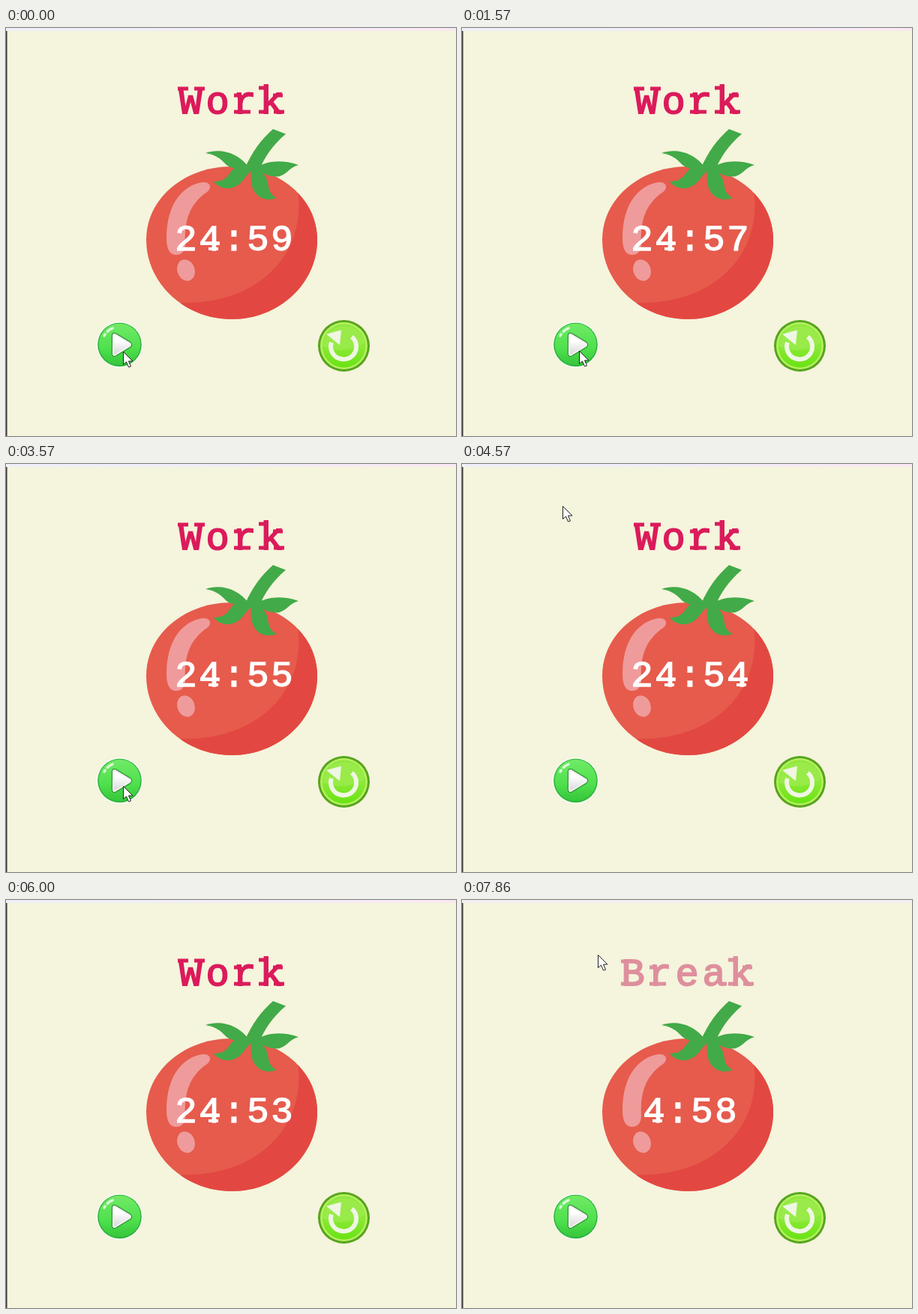
These frames come from a looping animation (600x545 px, 8000 ms). An HTML page:

```html
<!DOCTYPE html>
<html lang="en">
<head>
<meta charset="utf-8">
<title>Tomato timer</title>
<style>
  html, body { margin: 0; width: 100%; height: 100%; overflow: hidden; background: #f5f4dc; }
  svg { display: block; width: 100%; height: 100%; }
  text { font-family: "Liberation Mono", "Courier New", monospace; text-anchor: middle; }
  #title { font-size: 52px; letter-spacing: 4.8px; stroke-width: 1.8px; }
  #clock { font-size: 49px; letter-spacing: 2.6px; stroke: #fff; stroke-width: 1.4px; }
</style>
</head>
<body>
<svg viewBox="0 0 600 545">
  <defs>
    <linearGradient id="bar">
      <stop stop-color="#efeff8"/><stop offset=".5" stop-color="#f1edf6"/><stop offset="1" stop-color="#fae8f1"/>
    </linearGradient>
    <linearGradient id="playFill" x2="0" y2="1">
      <stop stop-color="#70ea68"/><stop offset=".6" stop-color="#4fe04c"/><stop offset="1" stop-color="#35c63b"/>
    </linearGradient>
    <linearGradient id="triangleFill" x2="0" y2="1">
      <stop offset=".3" stop-color="#fff"/><stop offset="1" stop-color="#d8d8d8"/>
    </linearGradient>
    <linearGradient id="resetFill" x2="0" y2="1">
      <stop stop-color="#8fe83c"/><stop offset=".5" stop-color="#8ce936"/><stop offset="1" stop-color="#69e313"/>
    </linearGradient>
    <path id="body" d="M187 283C187 228 237 185 301 185C365 185 415 228 415 283C415 341 364 389 301 389C238 389 187 341 187 283Z"/>
    <clipPath id="bodyClip"><use href="#body"/></clipPath>
    <path id="triangle" d="M143 411V435Q143 438 146 436.500L165 425Q167 423 165 421L146 409.500Q143 408 143 411Z" stroke-linejoin="round"/>
  </defs>

  <rect width="600" height="545" fill="#f5f4dc"/>
  <rect id="topBar" width="600" height="4" fill="url(#bar)"/>
  <rect y="4" width="1.5" height="541" fill="#3a3434"/>

  <g id="titleGroup">
    <text id="title" x="302.4" y="114"></text>
    <path id="titleSlabs" stroke="none"/>
  </g>

  <!-- Tomato -->
  <use href="#body" fill="#e65b4c"/>
  <path clip-path="url(#bodyClip)" fill="#e24841" d="M389 215H430V400H220L234 367C325 370 402 312 389 215Z"/>
  <g fill="#ef9b9b">
    <path d="M262 206C273 205 275 214 268 219C246 234 237 256 239 288C239 299 233 303 227 303C217 303 214 293 214 280C214 240 232 211 262 206Z"/>
    <ellipse cx="240" cy="323.5" rx="11.5" ry="14.5" transform="rotate(-20 240 323.5)"/>
  </g>
  <g fill="#42aa48">
    <path d="M356 135L373 141.500C356 156 345 172 337 191L319 187C327 167 340 149 356 135Z"/>
    <path d="M266 167C287 160 309 167 324 186L318 190C306 188 298 187 293 182C286 174 278 169 266 167Z"/>
    <path d="M326 185C306 183 302 189 297 196C292 203 285 205 277 205C284 215 299 217 309 210C318 204 320 195 328 191Z"/>
    <path d="M328 190C342 179 364 174 390 183C378 186 375 195 365 198C353 201 342 192 334 191Z"/>
    <path d="M327 186C326 202 326 215 336 224C343 230 353 230 361 227C349 221 351 212 348 203C345 195 340 191 335 187Z"/>
  </g>

  <g fill="#fff">
    <text id="clock" x="305.3" y="296.500"></text>
    <path id="clockSlabs"/>
  </g>

  <!-- Play button -->
  <circle cx="151.500" cy="423" r="31" fill="#f6faf2"/>
  <circle cx="151.500" cy="423" r="29.300" fill="#2fb43a"/>
  <circle cx="151.500" cy="422.500" r="27.800" fill="url(#playFill)"/>
  <path d="M131 411Q135 404 142 401" fill="none" stroke="#d9fbd2" stroke-width="3.500" stroke-linecap="round" stroke-dasharray="2 5 20"/>
  <use href="#triangle" stroke="#35983a" stroke-width="4.500"/>
  <use href="#triangle" fill="url(#triangleFill)" stroke="#f2f2f2" stroke-width="2"/>

  <!-- Reset button -->
  <circle cx="450.500" cy="424.500" r="34.500" fill="#57a51d"/>
  <circle cx="450.500" cy="424.500" r="31.500" fill="#b6f062"/>
  <circle cx="450.500" cy="424.500" r="29" fill="url(#resetFill)"/>
  <path d="M422 425Q450 438 479 420A29 29 0 0 0 422 425Z" fill="#a5ee5a" opacity=".5"/>
  <path d="M461 412.500A17 17 0 1 1 434 420" fill="none" stroke="#eff6e3" stroke-width="6"/>
  <path d="M427 409L447 403.500L445 423.500Z" fill="#eff6e3"/>

  <path id="cursor" d="M0 0V17L4 13.500L7 20.500L10 19.500L7 12.500H12.500Z" fill="#fff" stroke="#222"/>
</svg>
<script>
const LOOP = 8000, BREAK_START = 7570;
const $ = id => document.getElementById(id);

// Slab serifs per letter: [x in cell, height above baseline, width, thickness]
const SLABS = {
  W: [[1, 36, 14, 5], [23, 36, 14, 5]],
  r: [[4, 5, 22, 5], [4, 27, 8, 5]],
  k: [[1, 5, 13, 5], [21, 5, 14, 5], [1, 37, 8, 5], [20, 27, 13, 5]],
  B: [[2, 35, 8, 5], [2, 5, 8, 5]],
  a: [[28, 5, 7, 5]],
  4: [[14, 4, 13, 4]]
};

// Cursor stops: [start time, x, y]; no position means hidden
const CURSOR = [
  [0, 156, 432], [1570, 156, 431], [3430, 156, 430], [4290, 150, 370],
  [4430, 140, 180], [4570, 134, 56], [4710, 132, 12], [4860], [BREAK_START, 181, 73]
];

function write(id, text, center, baseline, pitch) {
  const node = $(id);
  if (node.textContent === text) return;
  node.textContent = text;
  const left = center - text.length * pitch / 2;
  $(id + "Slabs").setAttribute("d", [...text].flatMap((char, i) =>
    (SLABS[char] || []).map(([x, up, w, h]) =>
      `M${left + i * pitch + x} ${baseline - up}h${w}v${h}h${-w}z`)).join(""));
}

function draw(time) {
  const onBreak = time >= BREAK_START;
  const seconds = onBreak ? 298 : 1499 - Math.floor((time + 570) / 1000);
  const clock = Math.floor(seconds / 60) + ":" + String(seconds % 60).padStart(2, "0");
  const titleColor = onBreak ? "#de8f9d" : "#db1b5b";

  write("title", onBreak ? "Break" : "Work", 300, 114.5, 36);
  write("clock", clock, 304, 297, 32);
  $("titleGroup").setAttribute("fill", titleColor);
  $("titleGroup").setAttribute("stroke", titleColor);
  $("topBar").setAttribute("fill", onBreak ? "#f3f0f2" : "url(#bar)");

  const [, x, y] = CURSOR.findLast(stop => stop[0] <= time);
  $("cursor").setAttribute("visibility", x === undefined ? "hidden" : "visible");
  if (x !== undefined) $("cursor").setAttribute("transform", `translate(${x + .5} ${y + .5})`);
}

const start = performance.now();
function tick(now) {
  draw(Math.max(0, now - start) % LOOP);
  requestAnimationFrame(tick);
}
draw(0);
requestAnimationFrame(tick);
</script>
</body>
</html>
```
